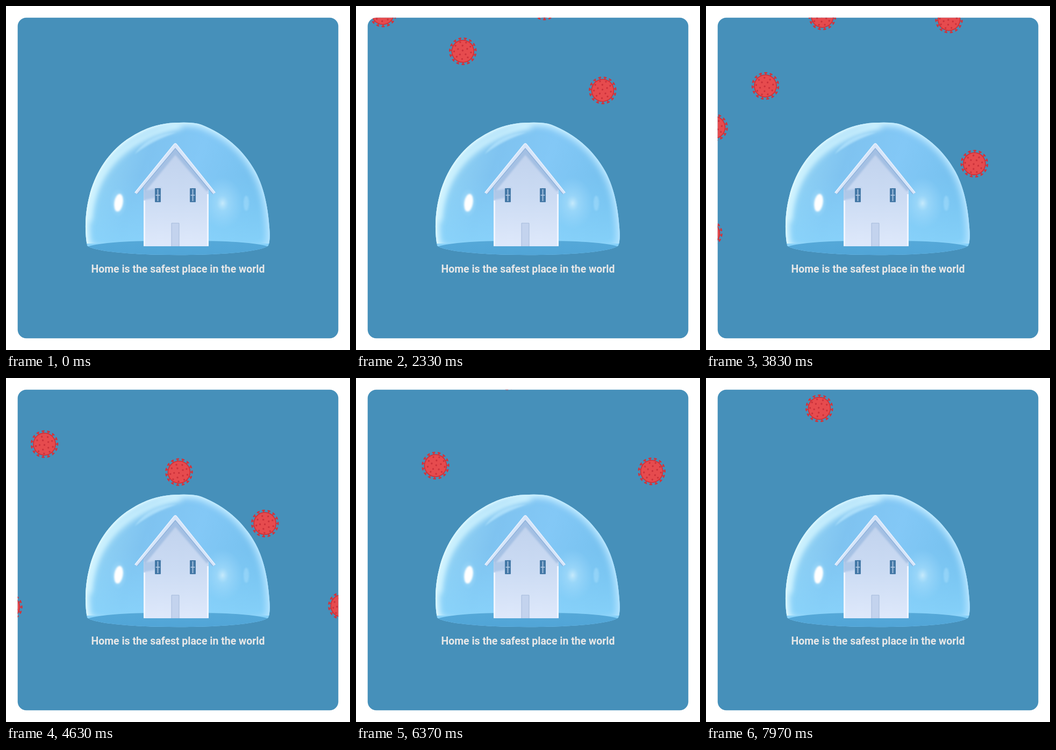
An HTML page for the animation above (8 s loop, 640 by 640 pixels).

```html
<!DOCTYPE html>
<html lang="en">
<head>
<meta charset="utf-8">
<title>Home is the safest place</title>
<style>
  html, body { margin: 0; width: 100%; height: 100%; overflow: hidden; background: #fff; }
  svg { display: block; width: 100vw; height: 100vh; }
  text { font: 700 19.45px Roboto, sans-serif; fill: #e8e8e8; text-anchor: middle; }
</style>
</head>
<body>
<svg viewBox="0 0 640 640">
  <defs>
    <clipPath id="panel"><rect x="21.7" y="21.7" width="596.6" height="596.6" rx="16"/></clipPath>
    <path id="dome" d="M151 446C146 420 147 385 155 354C166 308 195 265 235 242C264 224 292 217 322 217Q350 216 364 221C410 239 443 270 464 308C482 341 488 382 490 412Q492 436 488 446C460 469 180 469 151 446Z"/>
    <clipPath id="inside"><use href="#dome"/></clipPath>
    <clipPath id="upper"><rect x="140" y="210" width="360" height="232"/></clipPath>
    <linearGradient id="glass" x1="0" x2="1" y1=".1" y2=".35">
      <stop offset="0" stop-color="#9bdaf6"/><stop offset=".35" stop-color="#7fc3f0"/>
      <stop offset=".62" stop-color="#83c8f6"/><stop offset="1" stop-color="#74c0ee"/>
    </linearGradient>
    <linearGradient id="lower" x2="0" y2="1">
      <stop offset=".4" stop-color="#8ad5fc" stop-opacity="0"/><stop offset=".9" stop-color="#8ad5fc" stop-opacity=".75"/>
    </linearGradient>
    <linearGradient id="rim" x1="0" x2="1" y1=".3" y2=".5">
      <stop offset="0" stop-color="#e4fbff"/><stop offset=".5" stop-color="#c8eeff"/><stop offset="1" stop-color="#b3e3ff"/>
    </linearGradient>
    <linearGradient id="floor" x2="0" y2="1">
      <stop offset="0" stop-color="#55a8d8"/><stop offset="1" stop-color="#51a5d7"/>
    </linearGradient>
    <linearGradient id="wall" x2="0" y2="1">
      <stop offset="0" stop-color="#bfd1ec"/><stop offset=".5" stop-color="#cbdbf3"/><stop offset="1" stop-color="#dfe9fb"/>
    </linearGradient>
    <radialGradient id="glow">
      <stop offset="0" stop-color="#e6f9ff" stop-opacity=".85"/><stop offset=".3" stop-color="#c3ebff" stop-opacity=".45"/>
      <stop offset="1" stop-color="#b3e2ff" stop-opacity="0"/>
    </radialGradient>
    <clipPath id="front"><path d="M256 447V336L315 263L377 336V447Z"/></clipPath>
    <filter id="soft" x="-50%" y="-50%" width="200%" height="200%"><feGaussianBlur stdDeviation="6"/></filter>
    <filter id="slight" x="-50%" y="-50%" width="200%" height="200%"><feGaussianBlur stdDeviation="1.5"/></filter>
    <g id="window">
      <rect x="-5.5" y="-13" width="11" height="26" rx="1" fill="#4478a6"/>
      <path d="M0-11V11M-4 0H4" stroke="#b8cee8" stroke-width="1.6"/>
    </g>
    <g id="virus"></g>
  </defs>

  <g clip-path="url(#panel)">
    <rect width="640" height="640" fill="#4690ba"/>

    <use href="#dome" fill="url(#glass)"/>
    <g clip-path="url(#inside)">
      <use href="#dome" fill="url(#lower)"/>
      <g fill="none" clip-path="url(#upper)">
        <use href="#dome" stroke="url(#rim)" stroke-width="13" filter="url(#soft)"/>
        <path d="M153 400C158 320 205 248 325 222" stroke="#d3f5ff" stroke-width="12" filter="url(#soft)"/>
        <use href="#dome" stroke="url(#rim)" stroke-width="4" filter="url(#slight)"/>
      </g>
      <path d="M239 276Q265 238 318 235Q272 250 239 276Z" fill="#bde9ff" opacity=".6" filter="url(#slight)"/>
      <ellipse cx="320" cy="450" rx="170" ry="14" fill="url(#floor)"/>
      <path d="M151 446Q178 437 246 437H392Q460 438 489 446" fill="none" stroke="#8dd3f8" opacity=".5"/>
    </g>
    <ellipse cx="403" cy="367" rx="38" ry="48" fill="url(#glow)" opacity=".8"/>
    <ellipse cx="447" cy="367" rx="5" ry="14" fill="#b4e5ff" opacity=".4" filter="url(#slight)"/>
    <ellipse cx="209" cy="366" rx="16" ry="27" fill="url(#glow)"/>
    <ellipse cx="209.500" cy="366" rx="8" ry="16.500" fill="#fff" transform="rotate(9 209.500 366)" filter="url(#slight)"/>

    <g clip-path="url(#front)">
      <path d="M250 450V330L315 260L380 330V450Z" fill="url(#wall)"/>
      <path d="M256 342L315 270L377 342" fill="none" stroke="#8fb2dc" stroke-width="9" opacity=".6" filter="url(#slight)"/>
      <path d="M256 344L290 338L276 357L256 361Z" fill="#93b5de" opacity=".5" filter="url(#slight)"/>
      <path d="M257.500 362V446M375.500 350V446" stroke="#eff5ff" stroke-width="3"/>
    </g>
    <path d="M239 347L312 257Q315 253 318 257L390 347L385 350L315 265L244 350Z" fill="#d6e5f9"/>
    <path d="M244 350L315 265L385 350" fill="none" stroke="#8aafda" stroke-width="1.2"/>
    <path d="M240 347L312 258Q315 254 318 258L389 347" fill="none" stroke="#ecf5ff" stroke-width="1.2"/>
    <use href="#window" x="282.500" y="352"/>
    <use href="#window" x="347.500" y="352"/>
    <path d="M308 447V404H322V447" fill="#c3d3ee" stroke="#a5badb"/>

    <text x="320" y="495.500">Home is the safest place in the world</text>
    <g id="swarm"></g>
  </g>
</svg>
<script>
const LOOP = 8000;
const RADIUS = 27;
const GRAVITY = 220; // px/s², after a bounce
const WIND = 38;     // px/s², pushes outwards after a bounce
const NS = 'http://www.w3.org/2000/svg';

function add(parent, tag, attributes) {
  const node = parent.appendChild(document.createElementNS(NS, tag));
  for (const name in attributes) node.setAttribute(name, attributes[name]);
  return node;
}

function drawVirus() {
  const virus = document.getElementById('virus');
  const spikes = 15;
  for (let i = 0; i < spikes; i++) {
    add(virus, 'path', {
      d: 'M20 0H24.500M24.500-1.800V1.800', stroke: '#d2333b', 'stroke-width': 2.4,
      'stroke-linecap': 'round', transform: `rotate(${i * 360 / spikes})`
    });
  }
  add(virus, 'circle', { r: 20.5, fill: '#e64b4e', stroke: '#d0333b', 'stroke-width': 1.8 });
  for (const [count, radius] of [[1, 0], [5, 9], [9, 16]]) {
    for (let i = 0; i < count; i++) {
      const angle = i / count * 2 * Math.PI + radius;
      add(virus, 'circle', { cx: 1.5 + radius * Math.cos(angle), cy: radius * Math.sin(angle), r: 1.7, fill: '#cb323b' });
    }
  }
}

// A straight fall to the point of impact, then a ballistic arc; velocities in px/s
function flight(hit, x, y, fall, bounce, gravity = GRAVITY) {
  return time => {
    const s = (time - hit) / 1000;
    const [vx, vy] = s < 0 ? fall : bounce;
    const arc = s < 0 ? 0 : s * s / 2;
    return [x + vx * s + Math.sign(vx) * WIND * arc, y + vy * s + gravity * arc];
  };
}

const drop = [-32, 236];
const glance = [145, 74];
const slide = [-60, 0];
const flights = [
  // off the roof of the dome
  flight(1620, 256, 190, drop, [-67, -227]),
  flight(3120, 325, 187, drop, [-139, -408], 484),
  flight(4690, 320, 189, drop, [105, -194]),
  flight(5950, 190, 229, drop, [-92, -203]),
  flight(7190, 256, 190, drop, [-43, -257]),
  // off its right flank
  flight(2950, 488, 300, [47, 231], [300, -40]),
  flight(3850, 500, 299, [37, 293], glance),
  flight(4720, 485, 298, [37, 307], glance),
  // past its left flank
  flight(3830, 5, 423, [-30, 273], slide),
  flight(4630, 5, 426, [-132, 347], slide)
];

drawVirus();
const swarm = document.getElementById('swarm');
const nodes = flights.map(() => add(swarm, 'use', { href: '#virus' }));

function draw() {
  const time = performance.now() % LOOP;
  flights.forEach((place, i) => {
    const [x, y] = place(time);
    const visible = y > 22 - RADIUS && x > 22 - RADIUS && x < 618 + RADIUS;
    nodes[i].style.display = visible ? '' : 'none';
    nodes[i].setAttribute('transform', `translate(${x} ${y}) rotate(${60 - time * .07})`);
  });
  requestAnimationFrame(draw);
}
draw();
</script>
</body>
</html>
```
